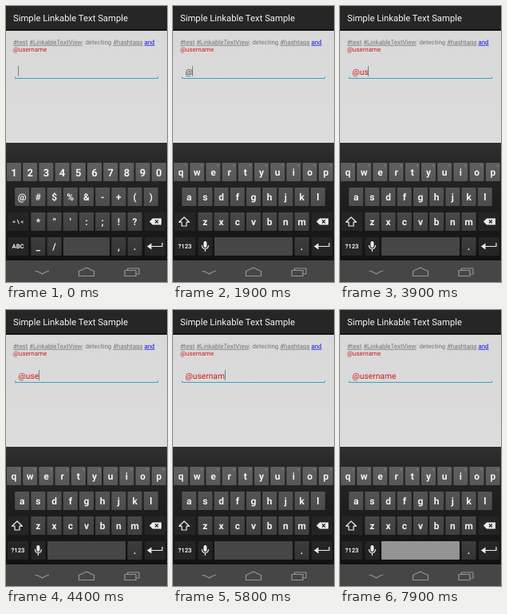
An HTML page for the animation above (8000 ms loop, 202 by 345 pixels).

```html
<!DOCTYPE html>
<html lang="en">
<head>
<meta charset="utf-8">
<title>Linkable text</title>
<style>
html, body { margin: 0; width: 100%; height: 100%; overflow: hidden; background: #ddd; }
svg { display: block; width: 100vw; height: 100vh; font-family: Roboto, "Noto Sans", sans-serif; text-rendering: geometricPrecision; }
.link { text-decoration: underline; text-decoration-thickness: 1px; text-underline-offset: 1px; }
.red { fill: #c8201c; }
.key { fill: url(#face); }
.space { fill: #464646; }
.fn { fill: #252525; }
.down { fill: #949494; }
.cap { fill: #f2f2f2; font-weight: 700; text-anchor: middle; }
.hint { fill: #999; font-size: 4px; text-anchor: middle; }
.icon { fill: none; stroke: #eee; stroke-width: 1.2; stroke-linejoin: round; }
.solid { fill: #eee; }
.nav { fill: none; stroke: #959595; stroke-width: 1.2; stroke-linejoin: round; }
</style>
</head>
<body>
<svg id="stage" viewBox="0 0 202 345" preserveAspectRatio="none">
  <defs>
    <linearGradient id="face" gradientUnits="userSpaceOnUse" x1="0" y1="196" x2="0" y2="312"><stop stop-color="#606060"/><stop offset="1" stop-color="#343434"/></linearGradient>
    <linearGradient id="board" x2="0" y2="1"><stop stop-color="#303030"/><stop offset=".2" stop-color="#262626"/><stop offset="1" stop-color="#121212"/></linearGradient>
    <linearGradient id="page" x2="0" y2="1"><stop stop-color="#d8d8d8"/><stop offset="1" stop-color="#e0e0e0"/></linearGradient>
  </defs>
  <rect width="202" height="345" fill="url(#page)"/>
  <rect width="202" height="31" fill="#262626"/>
  <rect y="29" width="202" height="2" fill="#161616"/>
  <text x="9" y="19" font-size="11.3" fill="#f3f3f3">Simple Linkable Text Sample</text>
  <g font-size="7.9" fill="#747474">
    <text x="9" y="47.8"><tspan class="link">#test</tspan> <tspan class="link">#LinkableTextView</tspan>: detecting <tspan class="link">#hashtags</tspan> <tspan class="link" fill="#1818e8">and</tspan></text>
    <text x="9" y="57.2" class="red">@username</text>
  </g>
  <path d="M11.5 88.5V90.5H190.5V88.5" fill="none" stroke="#35a3cc" stroke-width="1"/>
  <text id="entry" x="15.5" y="86.4" font-size="10.3"></text>
  <rect id="caret" y="75" width="1" height="13" fill="#808080"/>
  <rect y="171" width="202" height="147" fill="url(#board)"/>
  <g id="letters"></g>
  <g id="symbols"></g>
  <rect y="318" width="202" height="27" fill="#464646"/>
  <path class="nav" d="M36.5 331Q41.5 332 45.5 335Q49.5 332 54 331"/>
  <path class="nav" d="M91.5 331.5L101 327L110.5 331.5V337.5H91.5Z"/>
  <path class="nav" d="M149 330.5H163V337.5H149ZM152.5 330V328H167V335H163.5"/>
</svg>
<script>
const $ = id => document.getElementById(id);
const LOOP = 8000, PITCH = 20.2, TOPS = [196, 227, 258, 289], H = 23;

function add(parent, tag, attrs, text) {
  const el = document.createElementNS("http://www.w3.org/2000/svg", tag);
  for (const k in attrs) el.setAttribute(k, attrs[k]);
  if (text) el.textContent = text;
  return parent.appendChild(el);
}

function key(board, row, x, w, label, { kind = "key", size = 12, dy = 16.2 } = {}) {
  const y = TOPS[row];
  const face = add(board, "rect", { x, y, width: w, height: H, rx: 1, class: kind });
  face.dataset.rest = kind;
  face.dataset.label = label || kind;
  if (label) add(board, "text", { x: x + w / 2, y: y + dy, class: "cap", "font-size": size }, label);
}

function keyRow(board, row, first, labels, opt) {
  [...labels].forEach((c, i) => key(board, row, first + i * PITCH - 9, 18, c, opt));
}

// Backspace and enter are the same on both boards.
function sideKeys(board) {
  key(board, 2, 174, 26, "", { kind: "fn" });
  add(board, "path", { class: "solid", d: "M180 269.5L184 265.5H195V273.5H184Z" });
  add(board, "path", { d: "M187 267.5L191 271.5M191 267.5L187 271.5", stroke: "#222", "stroke-width": 1.2 });
  key(board, 3, 174, 26, "", { kind: "fn" });
  add(board, "path", { class: "icon", d: "M196 296V300.5H180" });
  add(board, "path", { class: "solid", d: "M177 300.5L182.5 296.5V304.5Z" });
}

function buildLetters(b) {
  keyRow(b, 0, 10, "qwertyuiop");
  [..."1234567890"].forEach((c, i) => add(b, "text", { x: 16 + i * PITCH, y: 200.5, class: "hint" }, c));
  keyRow(b, 1, 20.2, "asdfghjkl");
  key(b, 2, 2, 26, "", { kind: "fn" });
  add(b, "path", { class: "icon", d: "M14 264L20.5 270.2H17V275H11V270.2H7.5Z" });
  keyRow(b, 2, 40.4, "zxcvbnm");
  key(b, 3, 2, 26, "?123", { kind: "fn", size: 7.6, dy: 14.4 });
  key(b, 3, 31.4, 18, "", { kind: "fn" });
  add(b, "rect", { class: "solid", x: 38.4, y: 294, width: 4, height: 8, rx: 2 });
  add(b, "path", { class: "icon", d: "M36.4 299Q36.4 303.5 40.4 303.5T44.4 299M40.4 303.5V307" });
  key(b, 3, 52, 98, "", { kind: "space" });
  key(b, 3, 152.6, 18, ".");
  sideKeys(b);
}

function buildSymbols(b) {
  keyRow(b, 0, 10, "1234567890", { size: 13, dy: 16.6 });
  keyRow(b, 1, 20.2, "@#$%&-+()");
  key(b, 2, 2, 26, "= \\ <", { kind: "fn", size: 7, dy: 14.2 });
  keyRow(b, 2, 40.4, "*\"':;!?");
  key(b, 3, 2, 26, "ABC", { kind: "fn", size: 7.6, dy: 14.4 });
  keyRow(b, 3, 40.4, "_/");
  key(b, 3, 72, 58, "", { kind: "space" });
  keyRow(b, 3, 141.4, ",.");
  sideKeys(b);
}

const letters = $("letters"), symbols = $("symbols"), entry = $("entry"), caret = $("caret");
buildLetters(letters);
buildSymbols(symbols);

// Each press: time down, time up, key label
const presses = [
  [800, 900, "@"], [1600, 1700, "ABC"], [2500, 2600, "u"], [3600, 3700, "s"],
  [4100, 4200, "e"], [4600, 4700, "r"], [5300, 5400, "n"], [5500, 5600, "a"],
  [5700, 5800, "m"], [6200, 6300, "e"], [7900, 8000, "space"]
];
const SWITCH = 1700;
const faces = [...document.querySelectorAll("[data-label]")];
let shown = null;

function draw(t) {
  let text = "", since = 0, down = "";
  for (const [from, to, label] of presses) {
    if (t >= from && t < to) down = label;
    if (t >= to && label.length === 1) { text += label; since = to; }
  }
  const abc = t >= SWITCH;
  letters.style.display = abc ? "" : "none";
  symbols.style.display = abc ? "none" : "";
  for (const f of faces) f.setAttribute("class", f.dataset.label === down ? "down" : f.dataset.rest);
  if (text !== shown) {
    entry.textContent = shown = text;
    entry.setAttribute("fill", text.length > 1 ? "#c8201c" : "#444");
    caret.setAttribute("x", Math.round(15 + (text ? entry.getComputedTextLength() : 0)));
  }
  caret.style.display = Math.floor((t - since) / 500) % 2 ? "none" : "";
}

const start = performance.now();
function tick() {
  draw((performance.now() - start) % LOOP);
  requestAnimationFrame(tick);
}
tick();
</script>
</body>
</html>
```
